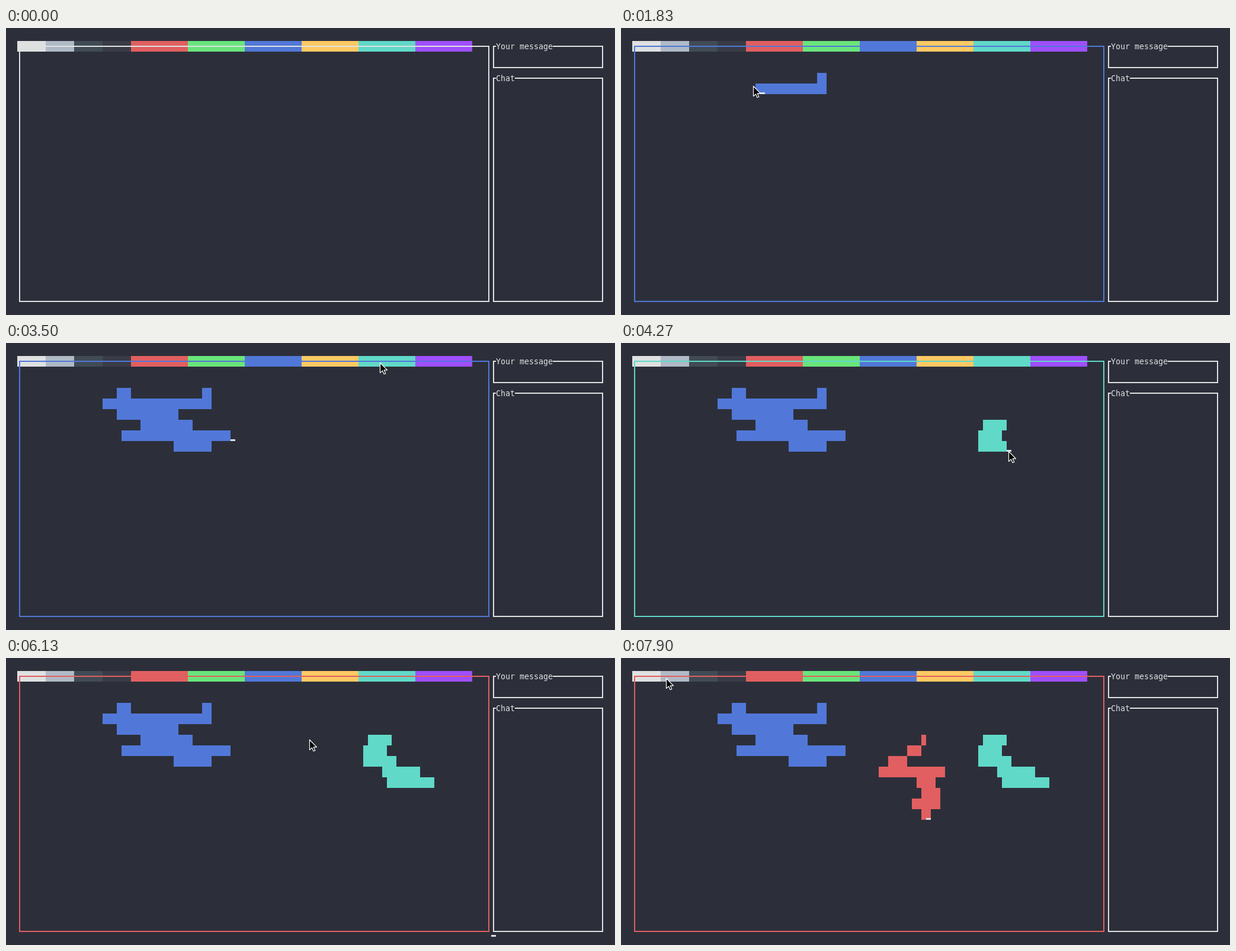
Write an HTML page with a canvas that moves like this. It is 1028 px wide and 486 px high and loops after 8.01 s.

```html
<!DOCTYPE html>
<html lang="en">
<head>
<meta charset="utf-8">
<title>Shared terminal canvas</title>
<style>
html, body { margin: 0; width: 1028px; height: 486px; overflow: hidden; background: #2c2f3a; }
canvas { display: block; }
</style>
</head>
<body>
<canvas id="stage" width="1028" height="486"></canvas>
<script>
const ctx = document.getElementById('stage').getContext('2d');
const LOOP = 8010, LAG = 17;
const CELL_W = 8, CELL_H = 18, LEFT = 19, TOP = 22;
const BG = '#2c2f3a', WHITE = '#dfe1e1';
const RED = '#e15f60', BLUE = '#5178d8', TEAL = '#60d9c8';
const GREYS = [WHITE, '#b0bac6', '#414b55', '#393c47'];
const HUES = [RED, '#69e57b', BLUE, '#ffc963', TEAL, '#9f4ffd'];
const PICKS = [{ t: 1080, color: BLUE }, { t: 3570, color: TEAL }, { t: 5470, color: RED }];
const HOME = { x: LEFT + 100 * CELL_W, y: TOP + 24 * CELL_H };

// Each leg carries the pointer on from where the last one ended.
const legs = [];
let tip = [3, 190];

function addLeg(start, end, path, color) {
  const points = [tip, ...path.split(' ').map(p => p.split(',').map(Number))];
  const lengths = points.slice(1).map(([x, y], i) => Math.hypot(x - points[i][0], y - points[i][1]));
  const total = lengths.reduce((a, b) => a + b);
  legs.push({ start, end, points, lengths, total, color });
  tip = points[points.length - 1];
}

const move = (start, end, path) => addLeg(start, end, path);
const brush = (start, end, color, path) => addLeg(start, end, path, color);

move(300, 960, '404,31');
move(1270, 1500, '333,80');
brush(1500, 2070, BLUE, '345,94 166,101 209,90');
brush(2070, 2370, BLUE, '190,114 313,134 228,143 338,163');
brush(2370, 2900, BLUE, '345,167 284,166 197,158 374,159');
move(2930, 3490, '631,34');
move(3770, 4000, '649,133');
brush(4000, 4690, TEAL, '606,150 641,158 605,172 697,195 637,200 721,214 645,214');
move(4690, 4930, '407,30');
move(4930, 5370, '281,31');
move(5700, 6140, '512,139');
brush(6140, 6650, RED, '507,148 483,166 451,184 437,190 545,194 501,211 537,238 493,246 521,257 509,264');
move(6700, 7200, '285,408');
move(7400, 7900, '112,7 76,35');

function along(l, t) {
  let u = Math.min(1, Math.max(0, (t - l.start) / (l.end - l.start)));
  if (!l.color) u = u * u * (3 - 2 * u);
  let rest = u * l.total, i = 0;
  while (i < l.lengths.length - 1 && rest > l.lengths[i]) rest -= l.lengths[i++];
  const [ax, ay] = l.points[i], [bx, by] = l.points[i + 1];
  const k = Math.min(1, rest / l.lengths[i]);
  return [ax + (bx - ax) * k, ay + (by - ay) * k];
}

const snap = (v, origin, size) => origin + Math.floor((v - origin) / size) * size;

// Every terminal cell the brush passes through, with its time.
const paint = [];
for (const l of legs.filter(l => l.color)) {
  for (let t = l.start; t <= l.end; t++) {
    const [px, py] = along(l, t);
    const x = snap(px, LEFT, CELL_W), y = snap(py, TOP, CELL_H);
    const last = paint[paint.length - 1];
    if (!last || last.x !== x || last.y !== y) paint.push({ t: t + LAG, x, y, color: l.color });
  }
}

function rect(color, x, y, w, h) {
  ctx.fillStyle = color;
  ctx.fillRect(x, y, w, h);
}

function frame(color, x, y, w, h, title = '') {
  ctx.strokeStyle = color;
  ctx.lineWidth = 2;
  ctx.strokeRect(x, y, w, h);
  if (!title) return;
  rect(BG, x + 4, y - 9, title.length * CELL_W, CELL_H);
  ctx.fillStyle = WHITE;
  ctx.font = '13.3px "DejaVu Sans Mono", monospace';
  ctx.fillText(title, x + 4, y + 5);
}

const arrow = new Path2D('M0 0V17L4 13.4L6.6 19.2L9.2 18.1L6.7 12.4H12Z');
function pointer([x, y]) {
  ctx.save();
  ctx.translate(Math.round(x) + 0.5, Math.round(y) - 0.5);
  ctx.fillStyle = '#000';
  ctx.strokeStyle = '#fff';
  ctx.lineWidth = 1.2;
  ctx.lineJoin = 'round';
  ctx.fill(arrow);
  ctx.stroke(arrow);
  ctx.restore();
}

function draw(t) {
  rect(BG, 0, 0, 1028, 486);
  GREYS.forEach((c, i) => rect(c, LEFT + 48 * i, TOP, 48, CELL_H));
  HUES.forEach((c, i) => rect(c, LEFT + 192 + 96 * i, TOP, 96, CELL_H));

  const pick = PICKS.filter(p => p.t <= t).pop();
  frame(pick ? pick.color : WHITE, 23, 31, 792, 432);
  frame(WHITE, 823, 31, 184, 36, 'Your message');
  frame(WHITE, 823, 85, 184, 378, 'Chat');

  const done = paint.filter(c => c.t <= t);
  for (const c of done) rect(c.color, c.x, c.y, CELL_W, CELL_H);

  if (pick) {
    const last = done[done.length - 1];
    const caret = last && last.t > pick.t ? { x: last.x + CELL_W, y: last.y } : HOME;
    rect(WHITE, caret.x, caret.y + 15, CELL_W, 3);
  }

  const current = legs.filter(l => l.start <= t).pop();
  if (current) pointer(along(current, t));
}

const begin = performance.now();
function tick() {
  draw((performance.now() - begin) % LOOP);
  requestAnimationFrame(tick);
}
tick();
</script>
</body>
</html>
```
